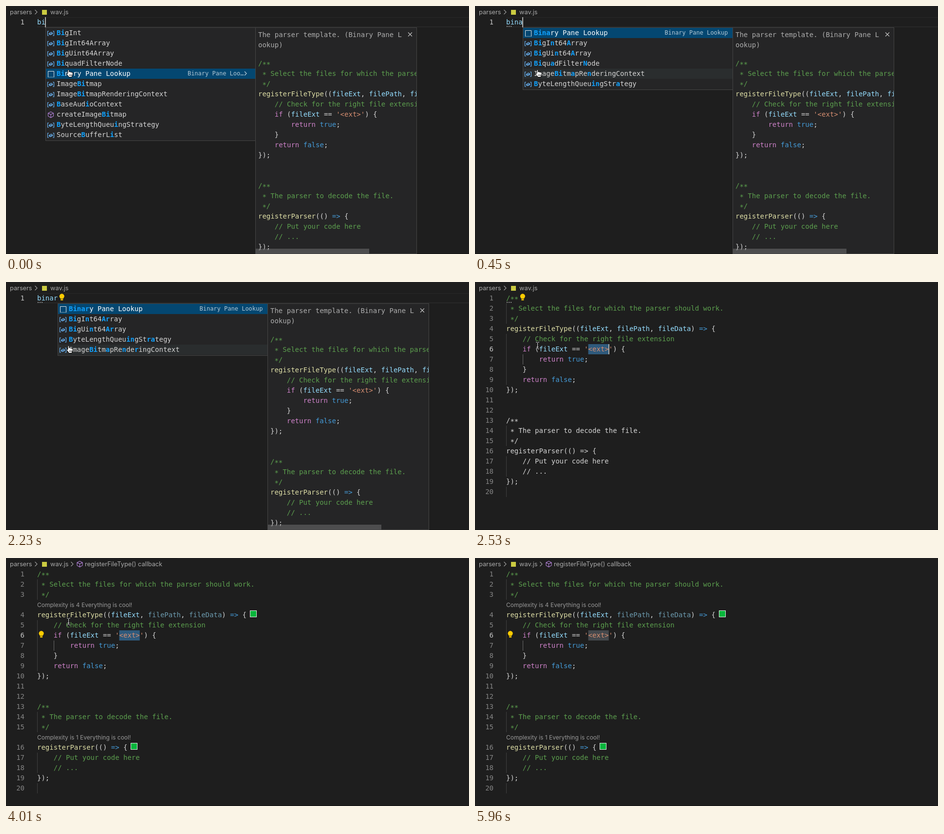
Write an HTML page with a canvas that moves like this. It is 951 px wide and 511 px high and loops after 6060 ms.

```html
<!DOCTYPE html>
<html lang="en">
<head>
<meta charset="utf-8">
<title>Snippet completion</title>
<style>
html, body { margin: 0; width: 100%; height: 100%; overflow: hidden; background: #1e1e1e; }
canvas { display: block; }
</style>
</head>
<body>
<canvas id="stage" width="951" height="511"></canvas>
<script>
const ctx = document.getElementById('stage').getContext('2d');
const LOOP = 6060, W = 951, H = 511;
const X0 = 64, TOP = 23, ROW = 21, CW = 8.43;
const MONO = '"DejaVu Sans Mono", monospace';
const SANS = 'Inter, sans-serif';
const NAME = 'Binary Pane Lookup';

const C = {
  bg: '#1e1e1e', text: '#d4d4d4', comment: '#5c9f4e', control: '#ce82c9', func: '#dedea6',
  variable: '#94dcfe', dim: '#6c9aae', constant: '#459bd8', string: '#d58d70',
  popup: '#252526', border: '#454545', select: '#044771', match: '#10a0fc'
};

const CODE = [
  '/**', ' * Select the files for which the parser should work.', ' */',
  'registerFileType((fileExt, filePath, fileData) => {',
  '    // Check for the right file extension',
  "    if (fileExt == '<ext>') {", '        return true;', '    }',
  '    return false;', '});', '', '',
  '/**', ' * The parser to decode the file.', ' */',
  'registerParser(() => {', '    // Put your code here', '    // ...', '});', ''
];

// Matched letters stand in square brackets.
const STEPS = [
  { at: 0, word: 'bi', pick: 4, rows: ['[Bi]gInt', '[Bi]gInt64Array', '[Bi]gUint64Array',
    '[Bi]quadFilterNode', '[Bi]' + NAME.slice(2), 'Image[Bi]tmap', 'Image[Bi]tmapRenderingContext',
    '[B]aseAud[i]oContext', 'createImage[Bi]tmap', '[B]yteLengthQueu[i]ngStrategy', 'Source[B]ufferL[i]st'] },
  { at: 150, word: 'bin', pick: 0, rows: ['[Bin]' + NAME.slice(3), '[Bi]gI[n]t', '[Bi]gI[n]t64Array',
    '[Bi]gUi[n]t64Array', '[Bi]quadFilter[N]ode', 'Image[Bi]tmapRe[n]deringContext',
    '[B]aseAud[i]oCo[n]text', '[B]yteLengthQueu[in]gStrategy'] },
  { at: 450, word: 'bina', pick: 0, rows: ['[Bina]' + NAME.slice(4), '[Bi]gI[n]t64[A]rray',
    '[Bi]gUi[n]t64[A]rray', '[Bi]qu[a]dFilter[N]ode', 'Image[Bi]tm[a]pRe[n]deringContext',
    '[B]yteLengthQueu[in]gStr[a]tegy'] },
  { at: 740, word: 'binar', pick: 0, rows: ['[Binar]' + NAME.slice(5), '[Bi]gI[n]t64[Ar]ray',
    '[Bi]gUi[n]t64[Ar]ray', '[B]yteLengthQueu[in]gSt[ra]tegy', 'Image[Bi]tm[a]pRe[n]de[r]ingContext'] }
];

const T = { bulb: 1190, insert: 2530, colour: 2670, gaps: 2820, crumb: 2970, lens: 3120, bulbMove: 3270, blur: 5960 };
const BLINKS = [1190, 1780, 2230, 2530, 3120, 3560, 4010, 4610, 5060, 5510, 5960];

function box(x, y, w, h, color) {
  ctx.fillStyle = color;
  ctx.fillRect(x, y, w, h);
}

function text(s, x, y, color, font = '14px ' + MONO, align = 'left') {
  ctx.font = font;
  ctx.fillStyle = color;
  ctx.textAlign = align;
  ctx.fillText(s, x, y);
}

// Each path is a flat list of coordinates.
function lines(color, width, ...paths) {
  ctx.strokeStyle = color;
  ctx.lineWidth = width;
  ctx.beginPath();
  for (const p of paths) {
    ctx.moveTo(p[0], p[1]);
    for (let i = 2; i < p.length; i += 2) ctx.lineTo(p[i], p[i + 1]);
  }
  ctx.stroke();
}

function tokenColor(tok, dimUnused) {
  if (/^register/.test(tok)) return C.func;
  if (/^(filePath|fileData)$/.test(tok)) return dimUnused ? C.dim : C.variable;
  if (tok === 'fileExt') return C.variable;
  if (/^(if|return)$/.test(tok)) return C.control;
  if (/^(true|false|=>)$/.test(tok)) return C.constant;
  return tok[0] === "'" ? C.string : C.text;
}

function codeLine(src, x, y, plain, dimUnused) {
  const comment = /^\s*(\/\*|\*|\/\/)/.test(src);
  const tokens = src.match(comment ? /\*|[^*]+/g : /'[^']*'|=>|\w+|\s+|[^\w\s']/g) || [];
  let col = 0;
  for (const tok of tokens) {
    const color = plain ? C.text : comment ? C.comment : tokenColor(tok, dimUnused);
    text(tok, x + col * CW, y + (tok === '*' ? 2 : 0), color);
    col += tok.length;
  }
}

function chevron(x, y) {
  lines('#a0a0a0', 1.1, [x, y - 4.5, x + 4.5, y, x, y + 4.5]);
}

function cube(x, y) {
  lines('#b180d7', 1.1,
    [x, y - 6, x + 5.5, y - 3.2, x + 5.5, y + 3, x, y + 6, x - 5.5, y + 3, x - 5.5, y - 3.2, x, y - 6],
    [x - 5.5, y - 3.2, x, y - 0.4, x + 5.5, y - 3.2], [x, y - 0.4, x, y + 6]);
}

function variableIcon(x, y) {
  lines('#6cb8fa', 1.1,
    [x - 4, y - 4.5, x - 6.5, y - 4.5, x - 6.5, y + 4.5, x - 4, y + 4.5],
    [x + 4, y - 4.5, x + 6.5, y - 4.5, x + 6.5, y + 4.5, x + 4, y + 4.5],
    [x - 3.5, y, x + 0.8, y - 2.6, x + 3.5, y - 1, x + 3.5, y + 0.8, x - 0.8, y + 2.8, x - 3.5, y + 1.6, x - 3.5, y],
    [x - 3.5, y, x - 0.8, y + 1, x + 3.5, y - 1]);
}

function snippetIcon(x, y) {
  lines('#e8e8e8', 1, [x - 6, y + 6, x - 6, y - 6, x + 6, y - 6, x + 6, y + 6]);
  for (let i = -6; i <= 6; i += 2) box(x + i - 0.5, y + 5.5, 1, 1, '#e8e8e8');
}

function bulb(col, top) {
  const x = X0 + (col + 1) * CW + 0.1;
  ctx.fillStyle = '#ffcc00';
  ctx.beginPath();
  ctx.arc(x, top + 6.3, 5, Math.PI * 0.8, Math.PI * 2.2);
  ctx.lineTo(x + 2.6, top + 11.5);
  ctx.lineTo(x - 2.6, top + 11.5);
  ctx.fill();
  box(x - 2.5, top + 12.3, 5, 2.5, '#ffcc00');
}

function hand() {
  ctx.save();
  ctx.translate(124, 130);
  ctx.beginPath();
  ctx.moveTo(3, 9);
  ctx.lineTo(3, 2.4);
  ctx.quadraticCurveTo(4.2, 0.3, 5.6, 2.4);
  ctx.lineTo(5.8, 6);
  ctx.quadraticCurveTo(7.4, 4.5, 8.5, 6.4);
  ctx.quadraticCurveTo(10, 5.2, 11, 7);
  ctx.quadraticCurveTo(13, 6.3, 13.3, 8.5);
  ctx.quadraticCurveTo(13.4, 12, 11.7, 14);
  ctx.lineTo(11.5, 16.5);
  ctx.lineTo(5, 16.5);
  ctx.quadraticCurveTo(4, 13.5, 0.8, 10.4);
  ctx.quadraticCurveTo(0.7, 8, 3, 9);
  ctx.closePath();
  ctx.fillStyle = '#fff';
  ctx.fill();
  ctx.strokeStyle = '#000';
  ctx.lineWidth = 1;
  ctx.stroke();
  lines('#000', 0.8, [6.5, 11, 6.5, 14], [8.6, 11, 8.6, 14], [10.6, 11, 10.6, 14]);
  ctx.restore();
}

function beam(x, y) {
  const shape = [[x - 3.5, y - 7, x - 1.5, y - 7, x, y - 5.5, x + 1.5, y - 7, x + 3.5, y - 7],
    [x, y - 5.5, x, y + 5.5],
    [x - 3.5, y + 7, x - 1.5, y + 7, x, y + 5.5, x + 1.5, y + 7, x + 3.5, y + 7],
    [x - 2, y + 3, x + 2, y + 3]];
  lines('#111', 2.4, ...shape);
  lines('#e6e6e6', 1, ...shape);
}

function caret(t, col, top) {
  if (BLINKS.filter(b => b <= t).length % 2) return;
  box(Math.floor(X0 + col * CW - 0.6), top, 2, ROW, '#aeafad');
}

function hintDots() {
  for (let i = 0; i < 3; i++) box(65 + i * 4, 41, 2, 2, '#8f8f8f');
}

function lineNumber(n, top, active) {
  text(n, 38, top + 15, active ? '#c6c6c6' : '#858585', undefined, 'right');
}

function breadcrumb(full) {
  const font = '12.75px ' + SANS, color = '#a9a9a9';
  box(0, 0, 232, 1, C.popup);
  box(352, 0, W - 352, 1, C.popup);
  text('parsers', 8, 17, color, font);
  chevron(59.5, 12.5);
  box(74, 8, 10, 10, '#cbcb41');
  text('wav.js', 91, 17, color, font);
  if (!full) return;
  chevron(133.5, 12.5);
  cube(151.5, 12.5);
  text('registerFileType() callback', 162, 17, color, font);
}

function listRow(item, i, step, left) {
  const y = 45 + i * ROW, picked = i === step.pick, hovered = i === 4;
  const label = item.replace(/[\[\]]/g, '');
  if (picked) box(left + 1, y, 430, ROW, C.select);
  else if (hovered) box(left + 1, y, 430, ROW, '#2a2d2e');

  if (label === NAME) snippetIcon(left + 11.5, y + 11.5);
  else if (label.startsWith('create')) cube(left + 11, y + 11);
  else variableIcon(left + 11, y + 11.5);

  let col = 0;
  item.split(/[\[\]]/).forEach((part, k) => {
    const hit = k % 2;
    text(part, left + 23 + col * CW, y + 15, hit ? C.match : picked ? '#fff' : C.text,
      (hit ? 'bold ' : '') + '14px ' + MONO);
    col += part.length;
  });

  if (!picked) return;
  const short = hovered ? NAME.slice(0, 15) + '…' : NAME;
  text(short, left + (hovered ? 407.5 : 421.5), y + 14, '#b4c8d5', '12px ' + MONO, 'right');
  if (hovered) lines('#c8d6df', 1.1, [left + 409, y + 6, left + 413, y + 10, left + 409, y + 14]);
}

function frameBox(x, y, w, h) {
  box(x, y, w, h, C.border);
  box(x + 1, y + 1, w - 2, h - 2, C.popup);
}

function details(x, barAlpha) {
  frameBox(x, 44, 332, 467);
  ctx.save();
  ctx.beginPath();
  ctx.rect(x + 1, 45, 330, 465);
  ctx.clip();
  const title = `The parser template. (${NAME})`;
  text(title.slice(0, 35), x + 6, 64, '#adadad');
  text(title.slice(35), x + 6, 85, '#adadad');
  CODE.forEach((src, i) => codeLine(src, x + 6, 122.5 + i * ROW));
  box(x + 1, 500, 233, 10, `rgba(121,121,121,${0.48 * barAlpha})`);
  ctx.restore();
  lines('#c5c5c5', 1.1, [x + 314, 54.5, x + 322, 62.5], [x + 322, 54.5, x + 314, 62.5]);
}

function drawTyping(t) {
  const step = STEPS.filter(s => s.at <= t).pop();
  const n = step.word.length, left = Math.round(X0 + n * CW);
  box(X0, TOP, W - X0, 1, '#282828');
  box(X0, TOP + ROW - 2, W - X0, 2, '#282828');
  lineNumber(1, TOP, true);
  text(step.word, X0, TOP + 15, C.variable);
  if (t >= 450) hintDots();
  if (t >= T.bulb) bulb(n, TOP);
  caret(t, n, TOP);

  const fading = (t >= 150 && t < 300) || (t >= 740 && t < 890);
  frameBox(left, 44, 432, step.rows.length * ROW + 3);
  step.rows.forEach((item, i) => listRow(item, i, step, left));
  details(left + 431, fading ? 0.4 : 1);
  hand();
}

function drawEditor(t) {
  const gaps = t >= T.gaps;
  const topOf = i => TOP + ROW * (i + (gaps ? (i >= 3) + (i >= 15) : 0));
  const selTop = topOf(5);

  box(X0 + 20 * CW, selTop, 5 * CW, ROW, t < T.blur ? '#2f5a7c' : '#44484c');
  CODE.forEach((src, i) => {
    const top = topOf(i);
    if (/^ /.test(src) || i === 19) box(X0, top, 1, ROW, '#404040');
    if (i === 6) box(98, top, 1, ROW, '#6a6a6a');
    lineNumber(i + 1, top, i === 5);
    codeLine(src, X0, top + 15, i >= 12 && t < T.colour, t >= T.crumb);
  });

  if (t < T.colour) hintDots();
  if (t >= T.lens) {
    for (const [i, level] of [[3, 4], [15, 1]]) {
      const top = topOf(i), x = Math.round(X0 + CODE[i].length * CW + 7);
      text(`Complexity is ${level} Everything is cool!`, X0, top - 6, '#999', '12px ' + SANS);
      box(x, top + 1, 14, 14, '#e4efe6');
      box(x + 1, top + 2, 12, 12, '#08b63c');
    }
  }
  if (t < T.bulbMove) bulb(3, TOP);
  else bulb(0, selTop);
  caret(t, 25, selTop);

  if (t < 4310) beam(128.5, 131);
  else if (t < 4460) beam(137, 148);
  else if (t < 4610) beam(291.5, 277);
}

function draw(t) {
  box(0, 0, W, H, C.bg);
  box(0, H - 1, W, 1, '#151515');
  breadcrumb(t >= T.crumb);
  if (t < T.insert) drawTyping(t);
  else drawEditor(t);
}

const start = performance.now();
function tick() {
  draw((performance.now() - start) % LOOP);
  requestAnimationFrame(tick);
}
tick();
</script>
</body>
</html>
```
